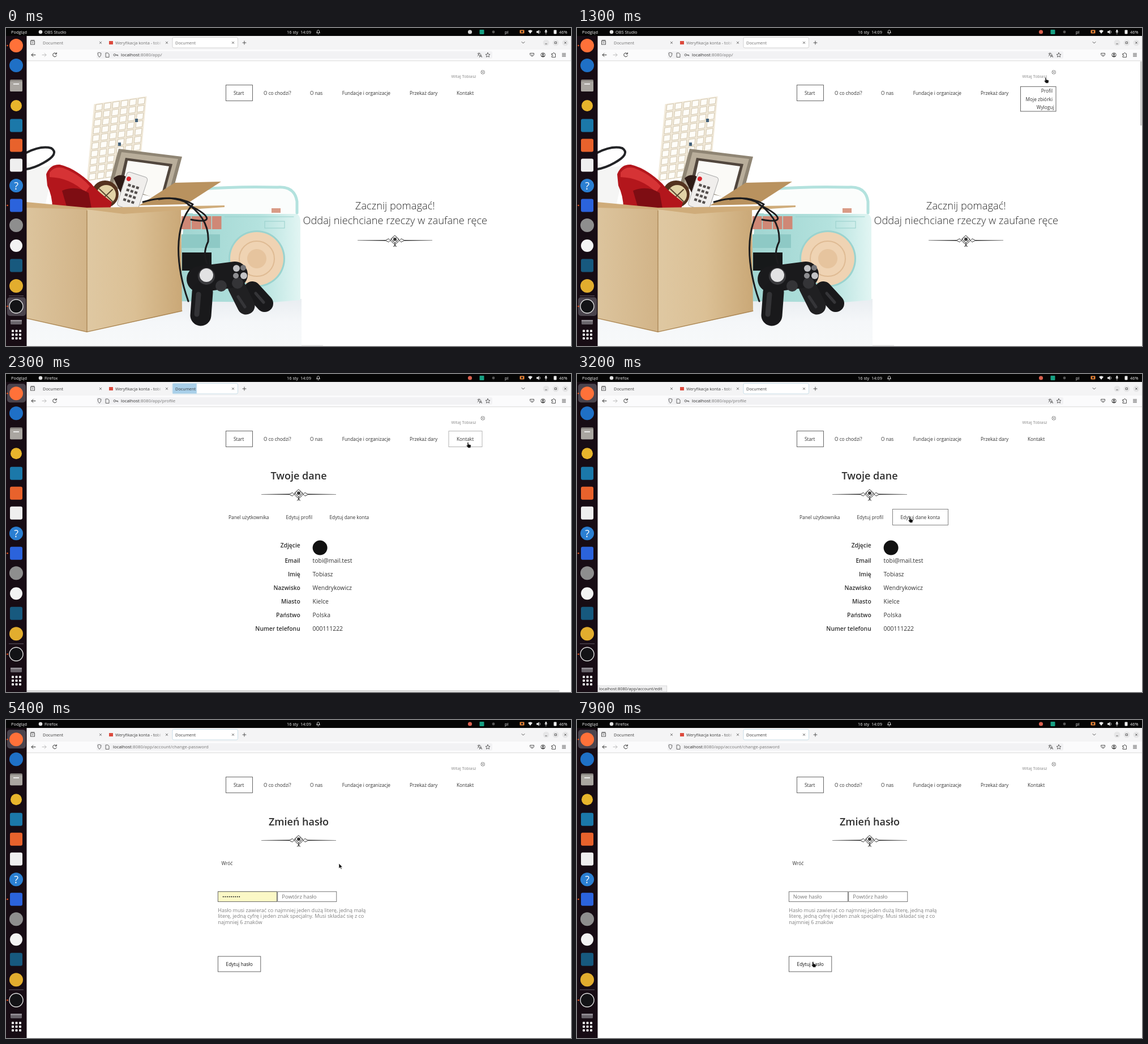
These frames come from a looping animation (998x561 px, 8000 ms). An HTML page:

```html
<!DOCTYPE html>
<html lang="pl">
<head>
<meta charset="utf-8">
<title>Document</title>
<style>
html, body { margin: 0; width: 100%; height: 100%; overflow: hidden; background: #fff; }
svg { display: block; width: 998px; height: 561px; }
text { font-family: "Open Sans", "Noto Sans", sans-serif; white-space: pre; }
</style>
</head>
<body>
<svg id="stage" viewBox="0 0 998 561"></svg>
<script>
const LOOP = 8000;
const FOCUS = 1950, PROFILE = 2150, EDIT = 3450, PASS = 4400;

const text = (x, y, s, size = 8.32, fill = '#333', more = '') =>
  `<text x="${x}" y="${y}" font-size="${size}" fill="${fill}" ${more}>${s}</text>`;
const rect = (x, y, w, h, fill, more = '') =>
  `<rect x="${x}" y="${y}" width="${w}" height="${h}" fill="${fill}" ${more}/>`;
const dot = (x, y, r, fill, more = '') => `<circle cx="${x}" cy="${y}" r="${r}" fill="${fill}" ${more}/>`;
const path = (d, fill, more = '') => `<path d="${d}" fill="${fill}" ${more}/>`;
const stroke = (d, color = '#444', w = 1) =>
  `<path d="${d}" fill="none" stroke="${color}" stroke-width="${w}" stroke-linecap="round" stroke-linejoin="round"/>`;
const frame = (x, y, w, h, color = '#555', fill = 'none') =>
  rect(x, y, w, h, fill, `stroke="${color}" stroke-width=".9"`);
const during = (from, to, ...parts) => `<g data-from="${from}" data-to="${to}">${parts.join('')}</g>`;
const range = (n, f) => Array.from({ length: n }, (_, i) => f(i)).join('');
const END = 'text-anchor="end"', MID = 'text-anchor="middle"';

function ornament(x, y) {
  const side = path('M-66,-.3L-17,-.7V.7L-66,.3z', '#222') + stroke('M-17,0L-11,-3L-5,3M-17,0L-11,3L-5,-3', '#222', .9);
  return `<g transform="translate(${x} ${y})">${side}<g transform="scale(-1 1)">${side}</g>
    ${stroke('M0,-8.5l7,6.5l-7,6.5l-7,-6.5zM-3.5,-5.3l7,6.5M3.5,-5.3l-7,6.5', '#222')}
    ${stroke('M-5,3l5,4.5l5,-4.5M0,4.5v6M-2.5,11l2.5,-3l2.5,3', '#222')}
    ${path('M0,-5.5l3.6,3.5l-3.6,3.5l-3.6,-3.5z', '#333')}</g>`;
}

function photo() {
  const keys = range(10, r => range(6, c => rect(c + .14, r + .12, .76, .78, '#fffdf8', 'stroke="#cfc3ab" stroke-width=".06"')));
  const remoteKeys = range(4, r => range(3, c => rect(-10 + c * 7.5, -9 + r * 9, 5, 4.5, '#55504e')));
  return [
    rect(36, 478, 486, 83, 'url(#floor)'),
    path('M36,236Q60,252 85,240L70,310H36z', '#f5f5f4'),
    stroke('M36,220Q62,207 80,212Q95,222 66,238Q50,247 36,249', '#222326', 4),
    // keyboard
    `<g transform="matrix(15 -2.2 -1.3 13.6 157 134)">${rect(-.1, 0, 6.2, 10, '#f1e9d9')}${keys}</g>`,
    rect(228, 160, 5, 6, '#44617a'), rect(198, 202, 5, 6, '#44617a'),
    // picture frame
    path('M199,213L311,227L290,305L181,280z', '#8f8574'),
    path('M204,219L304,231L285,300L188,278z', '#b9ae9b'),
    path('M211,229L294,240L277,303L199,280z', '#51463d'),
    path('M215,234L288,244L272,303L205,280z', '#fbfaf7'),
    // radio
    path('M316,327H508Q519,327 520,340V480L470,484L300,482z', 'url(#radio)'),
    path('M345,282Q400,277 480,280Q512,278 516,305V328H330z', '#fbfdfc'),
    stroke('M346,284Q410,279 480,281Q510,279 514,306V326', '#b3e2de', 5),
    rect(469, 318, 16, 8, '#d99b86'), stroke('M386,333H508', '#97d0cb'),
    range(4, i => rect(310 + i * 18, 332, 16.5, 23, '#cf8876')),
    rect(310, 364, 68, 24, '#8ec9c5'), rect(311, 396, 52, 32, '#17191a'),
    rect(457, 341, 35, 12, 'none', 'stroke="#97d0cb"'),
    dot(443, 407, 50, '#9ad3cf'), dot(443, 407, 47, '#efd3b3'),
    dot(443, 407, 31, 'none', 'stroke="#dfbb94" stroke-width="2"'), dot(443, 407, 17, '#e6c49e'),
    // compass, telephone and remote
    dot(175, 293, 24, '#54331f'), dot(177, 294, 17, '#e2d3a7'), stroke('M165,284L188,306M188,285L168,304', '#5c4a33', 2),
    path('M190,265Q205,252 222,270L203,292z', '#2d1b16'),
    path('M71,258Q78,240 95,241Q122,247 151,275Q160,287 187,307L184,319H82Q82,296 73,278Z', '#b3161c'),
    path('M77,255Q86,243 101,247Q130,258 148,279L140,290Q113,264 77,263z', '#d63335'),
    path('M99,287Q124,277 146,291L151,318H108z', '#7e0d13'),
    `<g transform="translate(223 286) rotate(18)">${rect(-18, -29, 38, 63, '#f0eeec', 'rx="5" stroke="#aaa"')}
      ${remoteKeys}${dot(-12, -17, 4, '#d9262d')}</g>`,
    // box
    path('M298,273L380,271L318,311L235,313z', '#b9925f'),
    path('M36,311L143,319V537L36,513z', 'url(#cardL)'),
    path('M143,319L309,317L311,500L143,537z', 'url(#cardR)'),
    path('M36,307L143,317L386,313V316L208,328L143,320L36,317z', '#cfac7a'),
    stroke('M143,322V536M143,536L311,499M36,512L143,536', '#a5804f', 1.2),
    // cables and game pad
    stroke('M242,307Q285,294 315,306Q360,335 357,377Q347,397 355,415M270,302Q304,296 330,311C295,350 300,420 322,482M322,312C360,330 369,346 327,338', '#1c1c1e', 3),
    stroke('M435,462L457,486', '#19191b', 30), stroke('M407,456L424,490', '#202022', 31),
    stroke('M342,443L404,435', '#1a1a1c', 46), stroke('M347,466L344,507', '#19191b', 37),
    stroke('M340,470L337,505', '#333336', 9), stroke('M410,474L422,492M441,468L455,484', '#353538', 5),
    dot(354, 438, 15, '#3b3b3e'), dot(354, 436, 12, '#e2e2e3'),
    dot(380, 455, 10, '#343437'), dot(409, 450, 10, '#343437'),
    dot(407, 424, 6, '#c3c3c5'), dot(420, 437, 6, '#c3c3c5'), dot(406, 437, 5, '#8d8d90'), dot(419, 423, 5, '#747478')
  ].join('');
}

function dock() {
  const disc = (y, c, r = 12) => dot(18, y, r, c);
  const tile = (y, c) => rect(7, y - 11.5, 22, 23, c, 'rx="3"');
  const icons = [
    disc(31, '#ff7139'), disc(66, '#1f70c6'),
    rect(7, 91, 22, 21, '#8b8782', 'rx="2"') + rect(7, 94, 22, 18, '#aaa6a1', 'rx="2"') + rect(13, 98, 10, 1.5, '#fff'),
    disc(137, '#e7b52c', 10), tile(172, '#1b78a9'), tile(207, '#e8622c'), tile(242, '#efefef'),
    disc(278, '#2b7fd2') + text(18, 284.5, '?', 18, '#fff', MID),
    tile(313, '#2b63dc'), disc(348, '#8e8e8e'), disc(384, '#f3f3f3', 11), tile(419, '#17597e'), disc(455, '#e2ad2e')
  ].join('');
  return rect(0, 14, 36.5, 547, '#170c14') + `<g id="dock">
    ${during(0, FOCUS, rect(2, 475, 33, 33, '#4b444d', 'rx="5"'))}
    ${during(FOCUS, LOOP, rect(2, 14, 33, 33, '#4b444d', 'rx="5"'))}
    ${icons}${rect(5, 472.3, 26, .8, '#77707a')}
    ${dot(18, 491, 12, '#131316', 'stroke="#ddd" stroke-width="1.4"')}
    ${[31, 313, 491].map(y => dot(2.5, y, 1.3, '#e95420')).join('')}
    ${rect(8, 515, 20, 8, '#69646b', 'rx="1.5"')}${rect(8, 515, 20, 2.5, '#969198')}</g>
    ${range(9, i => rect(10 + i % 3 * 6.5, 532.5 + Math.floor(i / 3) * 6.5, 4, 4, '#f3f3f3', 'rx="1"'))}`;
}

function topBar() {
  const bar = (x, y, s, more = '') => text(x, y, s, 7.4, '#f2f2f2', 'font-weight="500" ' + more);
  return [
    rect(0, 0, 998, 14, '#050505'),
    bar(9, 9.8, 'Podgląd'), dot(61, 7, 3.3, '#e4e4e4'),
    during(0, FOCUS, bar(68, 9.8, 'OBS Studio')), during(FOCUS, LOOP, bar(68, 9.8, 'Firefox')),
    bar(517.5, 9.8, '16 sty  14:09', MID),
    stroke('M548.5,8.5h6M549.5,8V5q2,-3 4,0v3M551,10.5h1', '#eee', .9),
    during(0, 200, dot(819.5, 7, 3.6, '#d4d4d4')), during(200, LOOP, dot(819.5, 7, 3.6, '#d9604f')),
    rect(836.5, 3, 8, 8, '#16a083', 'rx="1"'), dot(861, 7, 2.4, '#555'),
    bar(881, 9.8, 'pl'), rect(907.5, 3.5, 8, 6, '#e88335', 'rx="1"'), rect(910, 5, 3, 3, '#222'),
    path('M922,5q4,-3 8,0l-4,5z', '#eee'), path('M937,5.5h2l2.5,-2v7l-2.5,-2h-2z', '#eee'), stroke('M943,5q1.3,2 0,4', '#eee', .8),
    rect(952.5, 3, 2.6, 5, '#eee', 'rx="1.3"'), stroke('M951.5,6.5q2.3,4 4.6,0M953.8,9v2', '#eee', .7),
    rect(967.5, 3.5, 5, 7, '#eee', 'rx="1"'), bar(977, 9.8, '46%')
  ].join('');
}

function browser() {
  const tab = (x, s) => during(0, FOCUS, text(x, 28.6, s, 7.4, '#707070')) + during(FOCUS, LOOP, text(x, 28.6, s, 7.4, '#3c3c3c'));
  const close = x => stroke(`M${x - 1.7},24.2l3.4,3.4m0,-3.4l-3.4,3.4`, '#555', .8);
  const address = (x, rest) => text(x, 50.3, `localhost<tspan fill="#777">:8080/app/${rest}</tspan>`, 7.85, '#2c2c2c');
  return [
    rect(36, 14, 962, 24, '#f4f4f5'), rect(36, 38, 962, 20, '#fbfbfc'), rect(36, 57.5, 962, .8, '#cfcfcf'),
    frame(43.5, 23, 7, 6, '#444'), stroke('M44,21.5h6M45.5,26h3', '#444', .8),
    tab(65, 'Document'), close(167), rect(182, 23, 7, 6, '#dc4a3d'),
    `<g clip-path="url(#tabText)">${tab(193, 'Weryfikacja konta - tobi')}</g>`, rect(262, 20, 16, 12, 'url(#fade)'), close(284),
    during(0, FOCUS, rect(294, 16.5, 115.5, 18.5, '#fff', 'rx="2.5" stroke="#c9c9c9" stroke-width=".8"')),
    during(FOCUS, LOOP, rect(294, 16.5, 115.5, 18.5, '#fff', 'rx="2.5" stroke="#bcd7e4" stroke-width=".8"')),
    '<rect id="burst" x="294.5" y="17" height="17.5" fill="#a8cfe9"/>',
    tab(299, 'Document'), close(401), stroke('M418,26h6M421,23v6', '#444', .9),
    stroke('M911,24.5l2.5,2.5l2.5,-2.5', '#444', .9),
    [954, 971, 988].map(x => dot(x, 26, 5.5, '#e6e6e7')).join(''),
    stroke('M952.5,28h3M969.5,24.5h3v3h-3zM986.6,24.6l2.8,2.8m0,-2.8l-2.8,2.8', '#444', .8),
    stroke('M52,47.5h-7l3,-3m-3,3l3,3', '#333'), stroke('M64,47.5h7l-3,-3m3,3l-3,3', '#bbb'),
    stroke('M89,45.5a3.4,3.4 0 1 0 .3,3.2M89.3,43.5v2.5h-2.5', '#333'),
    rect(160, 41, 699, 13, '#f2f2f4', 'rx="2.5"'),
    stroke('M165,43.5l3,1q0,5 -3,7q-3,-2 -3,-7zM176.5,44h3.5l2,2v5.5h-5.5z', '#555', .9),
    during(0, PASS, dot(191.8, 47.5, 1.8, 'none', 'stroke="#555" stroke-width=".9"'), stroke('M193.7,47.5h4v1.7m-1.8,-1.7v1.4', '#555', .9)),
    during(0, PROFILE, address(203, '')), during(PROFILE, EDIT, address(203, 'profile')),
    during(EDIT, PASS, address(203, 'account/edit')), during(PASS, LOOP, address(189, 'account/change-password')),
    stroke('M833,45h5M835.5,43.8v1.2q0,3 -2.5,4.5M834,46.5l3,3M836.5,51.5l2,-5l2,5m-3.3,-1.6h2.6', '#444', .8),
    stroke('M851,43.6l1.2,2.6l2.8,.3l-2.1,1.9l.6,2.8l-2.5,-1.4l-2.5,1.4l.6,-2.8l-2.1,-1.9l2.8,-.3z', '#444', .8),
    stroke('M926,44.5h6.5v3q-3.2,5 -6.5,0zM927.7,46.8l1.6,1.5l1.6,-1.5', '#444', .9),
    dot(948.5, 47.5, 3.7, 'none', 'stroke="#333" stroke-width=".9"'), dot(948.5, 46.4, 1.4, '#333'), path('M946,49.6q2.5,-2 5,0q-2.5,2 -5,0z', '#333'),
    stroke('M964,45.5h2q0,-2 1.5,-2t1.5,2h1.5v6h-6.5v-2q2,-.2 2,-1.2t-2,-1.1z', '#444', .9),
    stroke('M982.5,45h6M982.5,47.5h6M982.5,50h6', '#333', .9)
  ].join('');
}

function siteHeader() {
  const links = [[402, 'Start'], [455, 'O co chodzi?'], [537, 'O nas'], [593.7, 'Fundacje i organizacje'], [713, 'Przekaż dary'], [796, 'Kontakt']];
  return text(830.5, 88.4, 'Witaj Tobiasz', 7.28, '#888', END)
    + dot(842.2, 78, 3.3, 'none', 'stroke="#777" stroke-width=".8"') + stroke('M839.8,76l4.8,4M840.5,79.8l3.4,-3.6', '#777', .7)
    + frame(388.5, 100.6, 47, 27.8)
    + links.map(([x, s]) => text(x, 117.6, s)).join('');
}

const title = s => text(517, 186.3, s, 18, '#2f2f2f', MID + ' font-weight="600"') + ornament(517, 212.3);

function home() {
  const slogan = (y, s) => text(687.3, y, s, 18.3, '#2b2b2b', MID + ' font-weight="300"');
  return [
    photo(), rect(522, 559.3, 38, 1.7, '#e9e9e9'),
    slogan(320, 'Zacznij pomagać!'), slogan(346, 'Oddaj niechciane rzeczy w zaufane ręce'),
    ornament(687, 374.7),
    during(800, FOCUS, rect(995.3, 59, 2, 113, '#b9b9b9')),
    during(1100, PROFILE, frame(783.5, 103.3, 62.5, 43.7, '#555', '#fff'),
      text(840, 114, 'Profil', 8.32, '#333', END), text(840, 128.5, 'Moje zbiórki', 8.32, '#333', END), text(842.5, 143, 'Wyloguj', 8.32, '#333', END))
  ].join('');
}

const status = s => rect(36, 550, s.length * 3.8 + 5, 11, '#f1f1f2', 'stroke="#ccc" stroke-width=".7"') + text(39, 558.2, s, 7.4);

function profile() {
  const rows = [['Email', 'tobi@mail.test'], ['Imię', 'Tobiasz'], ['Nazwisko', 'Wendrykowicz'],
    ['Miasto', 'Kielce'], ['Państwo', 'Polska'], ['Numer telefonu', '000111222']];
  const label = (y, s) => text(519.7, y, s, 10.3, '#2f2f2f', END + ' font-weight="600"');
  return [
    title('Twoje dane'), text(393, 255.5, 'Panel użytkownika'), text(494.5, 255.5, 'Edytuj profil'), text(571.5, 255.5, 'Edytuj dane konta'),
    label(306.2, 'Zdjęcie'), dot(554.6, 306.6, 13, '#111'),
    rows.map(([k, v], i) => label(333.4 + i * 23.9, k) + text(541.6, 333.4 + i * 23.9, v, 10.4)).join(''),
    during(PROFILE, 2600, frame(782, 100.7, 59, 27.8, '#aaa')),
    during(PROFILE, 3000, rect(36.5, 558.3, 941, 1.7, '#c6c6c6')),
    during(3000, EDIT, frame(557.5, 238.5, 98, 28, '#777'), status('localhost:8080/app/account/edit'))
  ].join('');
}

function account() {
  return title('Edytuj swoje konto') + text(429.7, 255.5, 'Wróć') + text(479.3, 255.5, 'Zmień email')
    + frame(543.3, 238.6, 75.3, 27.3, '#777') + text(557.2, 255.5, 'Zmień hasło') + text(429.7, 298.3, 'Usuń konto', 8.32, '#111')
    + status('localhost:8080/app/account/change-password');
}

function password() {
  const bullets = color => range(9, i => dot(383.8 + i * 3.55, 311.7, 1.05, color));
  const field = (x, fill) => frame(x, 302.8, 104, 17.6, '#666', fill);
  const hint = ['Hasło musi zawierać co najmniej jeden dużą literę, jedną małą',
    'literę, jedną cyfrę i jeden znak specjalny. Musi składać się z co', 'najmniej 6 znaków'];
  const placeholder = (x, s) => text(x, 315.1, s, 9.36, '#777');
  return [
    title('Zmień hasło'), text(380.5, 255.5, 'Wróć'),
    field(374.4, '#fff'), field(479.8, '#fff'), placeholder(487.3, 'Powtórz hasło'),
    during(PASS, 4700, placeholder(381.7, 'Nowe hasło')),
    during(4700, 6900, field(374.4, '#fbf8c6'), bullets('#222')),
    during(6300, 6900, rect(381.7, 305.2, 32, 13, '#e9431d'), bullets('#fff')),
    during(6900, LOOP, placeholder(381.7, 'Nowe hasło')),
    during(6100, 7500, rect(374.2, 302.5, 104.6, 18.3, 'none', 'stroke="#a84a28" stroke-width="1.7" rx="1"')),
    hint.map((s, i) => text(374.2, 338.8 + i * 10.35, s, 9.08, '#808080')).join(''),
    frame(374.4, 417, 75.4, 27), text(388.6, 433.7, 'Edytuj hasło', 8.32, '#111')
  ].join('');
}

function cursor() {
  const shapes = [
    path('M0,0V9L2.2,7L3.8,10.3L5.2,9.6L3.7,6.5H6.5z', '#111', 'stroke="#fff" stroke-width=".6"'),
    path('M-1,0Q0,-1.4 1,0V3L4.6,3.9Q5.6,4.4 5.3,6L4.5,9.3H.2L-2.9,5.2Q-3,3.9 -1,4.9z', '#111', 'stroke="#fff" stroke-width=".5"'),
    stroke('M-1.5,-4q1.5,0 1.5,1V3q0,1 1.5,1M1.5,-4q-1.5,0 -1.5,1M0,3q0,1 -1.5,1', '#888', .8)
  ];
  const kinds = [[800, 0], [1050, 1], [2600, 0], [3000, 1], [PASS, 0], [5800, 2], [7250, 0], [7700, 1], [LOOP]];
  return '<g id="cursor">' + kinds.slice(0, -1).map(([t, k], i) => during(t, kinds[i + 1][0], shapes[k])).join('') + '</g>';
}

const gradient = (id, colors, dir = '') => `<linearGradient id="${id}" ${dir}>`
  + colors.map((c, i) => `<stop offset="${i / (colors.length - 1)}" stop-color="${c}"/>`).join('') + '</linearGradient>';

document.getElementById('stage').innerHTML = `<defs>
  ${gradient('floor', ['#e9edf1', '#f5f7f9', '#f7f9fa'], 'x1="0" y1="0" x2="0" y2="1"')}
  ${gradient('cardL', ['#dcc49d', '#d2b488'])}${gradient('cardR', ['#dfc8a2', '#dbc095', '#caa877'])}
  ${gradient('radio', ['#a0d4d0', '#a9dbd7', '#b4e2de', '#e2f5f3'])}
  ${gradient('fade', ['#f4f4f500', '#f4f4f5'])}
  <clipPath id="tabText"><rect x="193" y="18" width="85" height="16"/></clipPath></defs>`
  + rect(0, 0, 998, 561, '#fff')
  + siteHeader()
  + during(0, PROFILE, home()) + during(PROFILE, EDIT, profile())
  + during(EDIT, PASS, account()) + during(PASS, LOOP, password())
  + browser() + dock() + topBar() + cursor();

// time, x, y
const route = [[800, 872, 40], [1100, 828, 88], [1400, 828, 88], [1800, 829, 111], [2000, 829, 111], [2300, 816, 121],
  [2500, 816, 121], [3100, 588, 253], [5400, 588, 253], [5900, 461, 307], [7200, 461, 307], [7450, 592, 350],
  [7550, 592, 350], [7800, 417, 427], [LOOP, 417, 427]];

function pointAt(t) {
  const i = Math.max(1, route.findIndex(p => p[0] > t));
  const [a, b] = [route[i - 1], route[i]];
  const k = Math.min(1, Math.max(0, (t - a[0]) / (b[0] - a[0])));
  const e = k * k * (3 - 2 * k);
  return [a[1] + (b[1] - a[1]) * e, a[2] + (b[2] - a[2]) * e];
}

const timed = [...document.querySelectorAll('[data-from]')]
  .map(el => ({ el, from: +el.dataset.from, to: +el.dataset.to }));
const byId = id => document.getElementById(id);
const pointer = byId('cursor'), burst = byId('burst'), launcher = byId('dock');

function draw() {
  const t = performance.now() % LOOP;
  for (const { el, from, to } of timed) el.style.display = t >= from && t < to ? '' : 'none';
  pointer.setAttribute('transform', `translate(${pointAt(t)})`);
  launcher.setAttribute('transform', `translate(0 ${t < FOCUS ? 0 : 3.2})`);
  const age = Math.min(...[PROFILE, EDIT, PASS].map(s => t < s ? Infinity : t - s));
  burst.setAttribute('width', age < 400 ? Math.min(114.5, age * .28) : 0);
  burst.setAttribute('opacity', age < 400 ? Math.min(1, (400 - age) / 150) : 0);
  requestAnimationFrame(draw);
}
draw();
</script>
</body>
</html>
```
